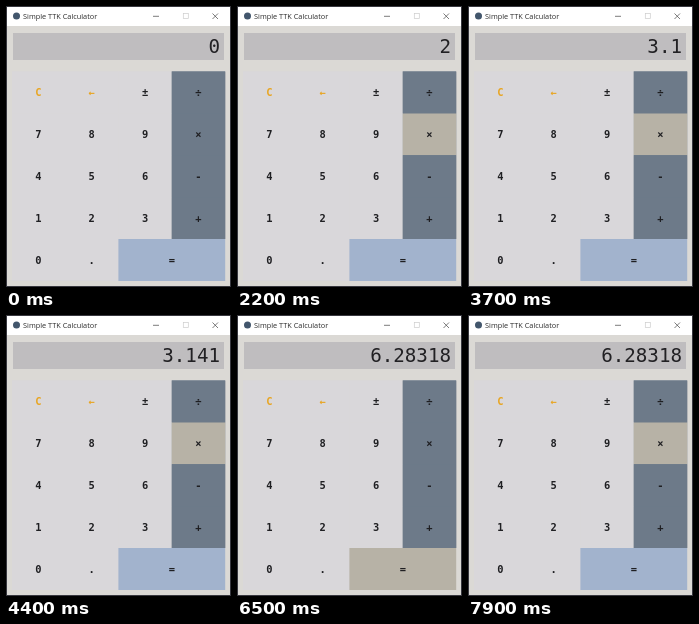
These frames come from a looping animation (225 by 281 pixels, 8 s). An HTML page:

```html
<!DOCTYPE html>
<html lang="en">
<head>
<meta charset="utf-8">
<title>Simple TTK Calculator</title>
<style>
html, body { margin: 0; width: 100%; height: 100%; overflow: hidden; background: #dbd9d5; }
svg { display: block; width: 225px; height: 281px; }
.title { font: 7.34px "Open Sans", "Noto Sans", sans-serif; fill: #2c2c2c; }
.value { font: 19.2px "DejaVu Sans Mono", "Noto Sans Mono", monospace; fill: #222124; text-anchor: end; }
.key { font: bold 10.4px "DejaVu Sans Mono", "Noto Sans Mono", monospace; fill: #1f1f22; text-anchor: middle; }
.icon { fill: none; stroke: #444; stroke-width: .7; }
</style>
</head>
<body>
<svg id="app" viewBox="0 0 225 281">
  <rect width="225" height="281" fill="#dbd9d5"/>
  <rect width="225" height="20" fill="#fff"/>
  <circle cx="10.5" cy="10" r="3.5" fill="#42566c"/>
  <text class="title" x="17" y="13.2">Simple TTK Calculator</text>
  <path class="icon" d="M147 10.3h6M206.5 7.5l5.5 5.5M212 7.5l-5.5 5.5"/>
  <rect class="icon" x="177.3" y="7.5" width="5" height="5" style="stroke:#ccc"/>
  <rect x="7" y="27" width="211" height="27" fill="#bfbdbf"/>
  <text class="value" id="value" x="214" y="46.8">0</text>
  <g id="keys"></g>
  <rect x=".5" y=".5" width="224" height="280" fill="none" stroke="#38383f"/>
</svg>
<script>
const LOOP = 8000, FLASH = 100;
const PLAIN = '#d9d7da', OPERATOR = '#6d7a89', EQUALS = '#a2b3cd', PRESSED = '#b7b2a6';
const X = [6, 59, 112.4, 165.7, 219.2];
const Y = [65.5, 107.5, 149.2, 191.2, 233, 275];
const ROWS = ['C←±÷', '789×', '456-', '123+', '0.='];

// [time, key, display]
const STEPS = [
  [700, '2', '2'],
  [1400, '×', '2'],
  [2500, '3', '3'],
  [3000, '.', '3.'],
  [3400, '1', '3.1'],
  [3900, '4', '3.14'],
  [4300, '1', '3.141'],
  [4800, '5', '3.1415'],
  [5300, '9', '3.14159'],
  [6500, '=', '6.28318'],
  [7500, '×', '6.28318']
];

const value = document.getElementById('value');
const panel = document.getElementById('keys');
const keys = {};

function add(tag, attrs, text = '') {
  const el = document.createElementNS('http://www.w3.org/2000/svg', tag);
  for (const name in attrs) el.setAttribute(name, attrs[name]);
  el.textContent = text;
  return panel.appendChild(el);
}

function addRect(left, top, right, bottom, fill) {
  return add('rect', { x: left, y: top, width: right - left, height: bottom - top, fill });
}

// Solid backing keeps seams between neighbouring keys invisible.
addRect(X[0], Y[0], X[3], Y[5], PLAIN);
addRect(X[3], Y[0], X[4], Y[4], OPERATOR);

ROWS.forEach((row, r) => [...row].forEach((label, c) => {
  const right = label === '=' ? X[4] : X[c + 1];
  const fill = label === '=' ? EQUALS : c === 3 ? OPERATOR : PLAIN;
  const rect = addRect(X[c], Y[r], right, Y[r + 1], fill);
  const text = add('text', {
    class: 'key', x: (X[c] + right) / 2, y: (Y[r] + Y[r + 1]) / 2 + 3.5
  }, label);
  if (label === 'C' || label === '←') text.style.fill = '#e8a522';
  keys[label] = { rect, fill };
}));

function render(t) {
  let display = '0', pending = '', flash = '';
  for (const [at, key, shown] of STEPS) {
    if (t < at) break;
    display = shown;
    if (key === '×') pending = key;
    if (key === '=') pending = '';
    flash = t < at + FLASH ? key : '';
  }
  value.textContent = display;
  for (const label in keys) {
    const { rect, fill } = keys[label];
    rect.setAttribute('fill', label === pending || label === flash ? PRESSED : fill);
  }
}

function frame() {
  render(performance.now() % LOOP);
  requestAnimationFrame(frame);
}
frame();
</script>
</body>
</html>
```
